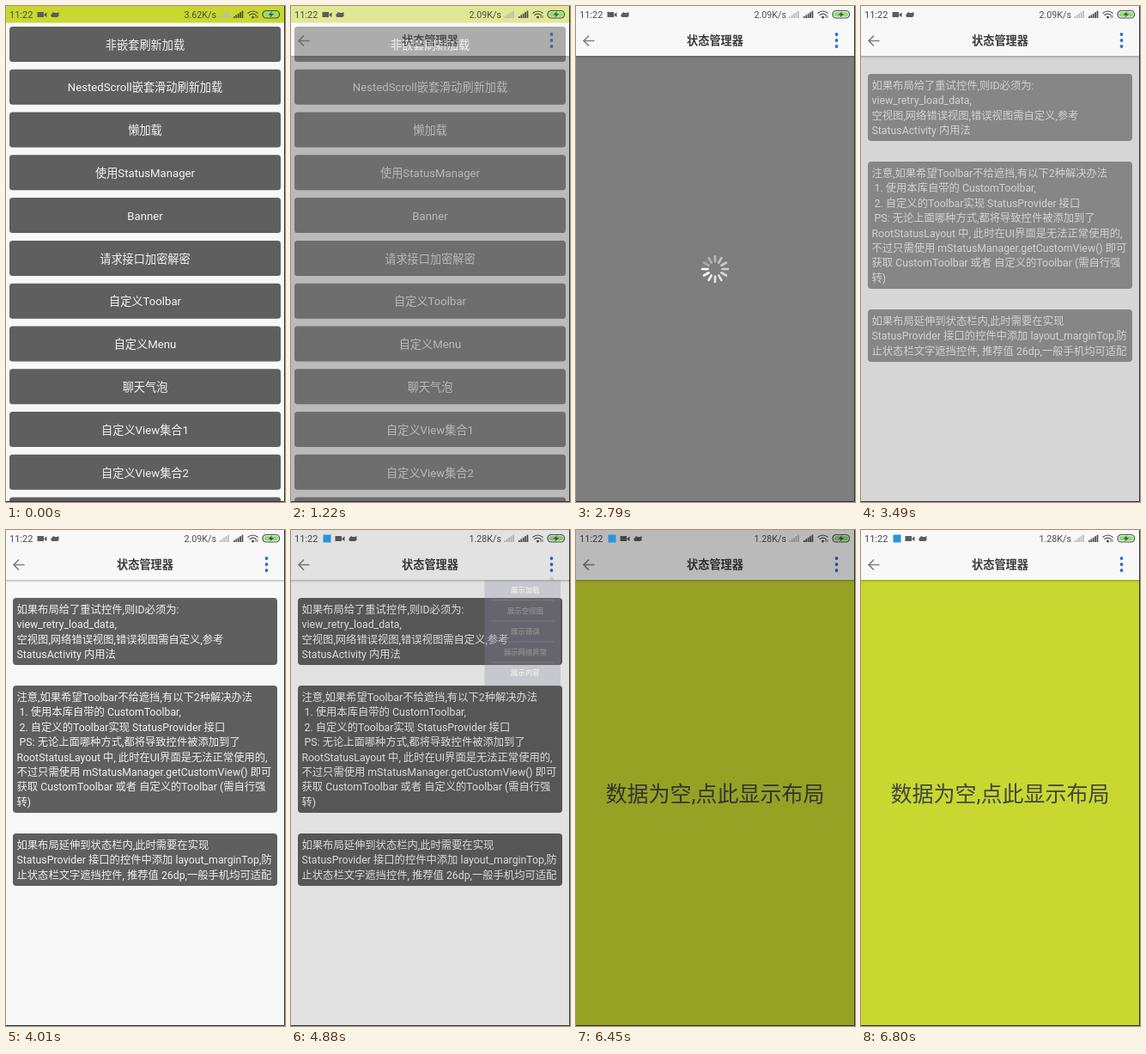
An HTML page that plays this animation: 325 px wide and 577 px high, repeating every 8000 ms.

```html
<!DOCTYPE html>
<html lang="zh-CN">
<head>
<meta charset="utf-8">
<style>
  html, body { margin: 0; width: 100%; height: 100%; overflow: hidden; background: #f8f8f8; }
  svg { display: block; width: 325px; height: 577px; }
  text { font-family: Roboto, "Noto Sans CJK SC", "Noto Sans CJK", sans-serif; white-space: pre; }
</style>
</head>
<body>
<svg viewBox="0 0 325 577">
  <defs>
    <linearGradient id="shade" x2="0" y2="1">
      <stop stop-opacity=".24"/><stop offset="1" stop-opacity="0"/>
    </linearGradient>
  </defs>
  <rect width="325" height="577" fill="#f8f8f8"/>
  <g id="list"><rect width="325" height="19.5" fill="#c8d830"/></g>

  <g id="page">
    <rect width="325" height="577" fill="#f8f8f8"/>
    <g id="cards"></g>
    <rect id="loading" y="58" width="325" height="519" fill="#7e7e7e"/>
    <g id="spinner" stroke="#fff" stroke-width="2.6" stroke-linecap="round"></g>
    <g id="empty">
      <rect y="58" width="325" height="519" fill="#c8d830"/>
      <text x="162" y="316" font-size="25" fill="#444" text-anchor="middle">数据为空,点此显示布局</text>
    </g>
    <rect y="58" width="325" height="3" fill="url(#shade)"/>
    <text x="162" y="45" font-size="13.2" font-weight="700" fill="#3a3a3a" text-anchor="middle">状态管理器</text>
    <path d="M21.5 40.5H9.5M15 34.5l-6 6 6 6" fill="none" stroke="#808080" stroke-width="1.7"/>
    <g fill="#2b70d8">
      <circle cx="303.5" cy="33" r="1.9"/><circle cx="303.5" cy="40" r="1.9"/><circle cx="303.5" cy="47" r="1.9"/>
    </g>
  </g>

  <g id="status" fill="#4a4a4a">
    <text x="4" y="14" font-size="11">11:22</text>
    <g id="icons" fill="#5c5c5c">
      <path d="M36.5 7h7.5v6h-7.5zM44.5 9.5l3-2v5.500l-3-2z"/>
      <path d="M54 8l1.500-1 1 1h3l2-1v5l-2 1h-6l-1.500-2z"/>
    </g>
    <text id="speed" x="245" y="14" font-size="10.7" text-anchor="end"></text>
    <g id="bars"></g>
    <g fill="none" stroke="#4a4a4a" stroke-width="1.2">
      <path d="M281.500 8.500q6-5 12 0M283.500 10.700q4-3.300 8 0"/>
      <rect x="299" y="5.500" width="19.500" height="8.500" rx="4"/>
    </g>
    <circle cx="287.500" cy="13" r="1.500"/>
    <path d="M291 14v-3M293 11v3" stroke="#4a4a4a" stroke-width=".8"/>
    <rect x="300.500" y="7" width="16.500" height="5.500" rx="2.700" fill="#8ce070"/>
    <path d="M310 6l-4.500 4.500h3l-1 3 4.500-4.500h-3z"/>
  </g>

  <rect id="dim" width="325" height="577"/>
  <rect id="notice" x="37.500" y="5.500" width="9" height="9" fill="#2796dc"/>
  <g id="popup" fill="#8b8aa3">
    <path d="M298.500 60.500l5-7 5 7z"/>
    <rect x="195" y="60" width="123" height="171" rx="2"/>
  </g>
  <path d="M324.500 0V576.500H0" fill="none" stroke="#333"/>
</svg>
<script>
const LOOP = 8000, TICK = 174.1;
const $ = id => document.getElementById(id);
const add = (id, markup) => $(id).insertAdjacentHTML('beforeend', markup);
const show = (id, alpha) => $(id).setAttribute('opacity', +alpha);
const label = (x, y, size, text, extra = '') =>
  `<text x="${x}" y="${y}" font-size="${size}" ${extra}>${text}</text>`;

const buttons = ['非嵌套刷新加载', 'NestedScroll嵌套滑动刷新加载', '懒加载', '使用StatusManager',
  'Banner', '请求接口加密解密', '自定义Toolbar', '自定义Menu', '聊天气泡',
  '自定义View集合1', '自定义View集合2', ''];
buttons.forEach((name, i) => {
  const y = 24 + i * 49.78;
  add('list', `<rect x="4" y="${y}" width="316" height="41" rx="3.5" fill="#5f5f5f"/>` +
    label(162, y + 25.7, 13.2, name, 'fill="#f4f4f4" text-anchor="middle"'));
});

const cards = [
  [79, 78, `如果布局给了重试控件,则ID必须为:
view_retry_load_data,
空视图,网络错误视图,错误视图需自定义,参考
StatusActivity 内用法`],
  [181, 148, `注意,如果希望Toolbar不给遮挡,有以下2种解决办法
 1. 使用本库自带的 CustomToolbar,
 2. 自定义的Toolbar实现 StatusProvider 接口
 PS: 无论上面哪种方式,都将导致控件被添加到了
RootStatusLayout 中, 此时在UI界面是无法正常使用的,
不过只需使用 mStatusManager.getCustomView() 即可
获取 CustomToolbar 或者 自定义的Toolbar (需自行强
转)`],
  [353, 61, `如果布局延伸到状态栏内,此时需要在实现
StatusProvider 接口的控件中添加 layout_marginTop,防
止状态栏文字遮挡控件, 推荐值 26dp,一般手机均可适配`]
];
for (const [y, height, text] of cards) {
  add('cards', `<rect x="8" y="${y}" width="308" height="${height}" rx="4" fill="#5f5f5f"/>`);
  text.split('\n').forEach((line, i) =>
    add('cards', label(12.5, y + 18 + i * 17.4, 12.3, line, 'fill="#f0f0f0"')));
}

['展示加载', '展示空视图', '展示错误', '展示网络异常', '展示内容'].forEach((name, i) => {
  const y = 76 + i * 33.5;
  add('popup', label(261, y + 4.3, 11.7, name, 'fill="#fff" font-weight="700" text-anchor="middle"'));
  if (i < 4) add('popup', `<path d="M206 ${y + 16.5}H308" stroke="#e4e4ea"/>`);
});

// Two signal meters of five rising bars
[[248.5, '#bbb'], [265, '#4a4a4a']].forEach(([x, color]) => {
  for (let i = 0; i < 5; i++)
    add('bars', `<rect x="${x + i * 2.4}" y="${12 - i * 1.6}" width="1.7" height="${2 + i * 1.6}" fill="${color}"/>`);
});

for (let i = 0; i < 12; i++)
  add('spinner', `<path d="M0 -8.5V-15" transform="rotate(${i * 30})" opacity="${1 - (17 - i) % 12 * .06}"/>`);

function draw(now) {
  const n = Math.floor(now % LOOP / TICK);
  const ramp = (start, values) => n < start ? 0 : values[Math.min(n - start, values.length - 1)];
  const content = ramp(20, [.72, .95, 1]);
  const late = n >= 28;
  const open = n < 37 ? ramp(28, [.3, .7, .95, 1]) : 0;

  show('list', n < 8);
  show('page', ramp(7, [.5, 1]));
  show('cards', content);
  show('loading', 1 - content);
  show('spinner', n >= 8 && n < 20);
  show('empty', n >= 37);
  show('dim', n < 37 ? ramp(28, [.09, .2, .28, .3]) : ramp(37, [.25, .1, 0]));
  show('popup', open);
  show('notice', late);

  const scale = .6 + .4 * open;
  $('popup').setAttribute('transform', `translate(303.5 54) scale(${scale}) translate(-303.5 -54)`);
  $('icons').setAttribute('transform', `translate(${late ? 15 : 0})`);
  $('spinner').setAttribute('transform', `translate(162 306) rotate(${(n - 8) * 60})`);
  $('speed').textContent = (n < 2 ? '3.62' : late ? '1.28' : '2.09') + 'K/s';
}

const start = performance.now();
(function frame() {
  draw(performance.now() - start);
  requestAnimationFrame(frame);
})();
</script>
</body>
</html>
```
